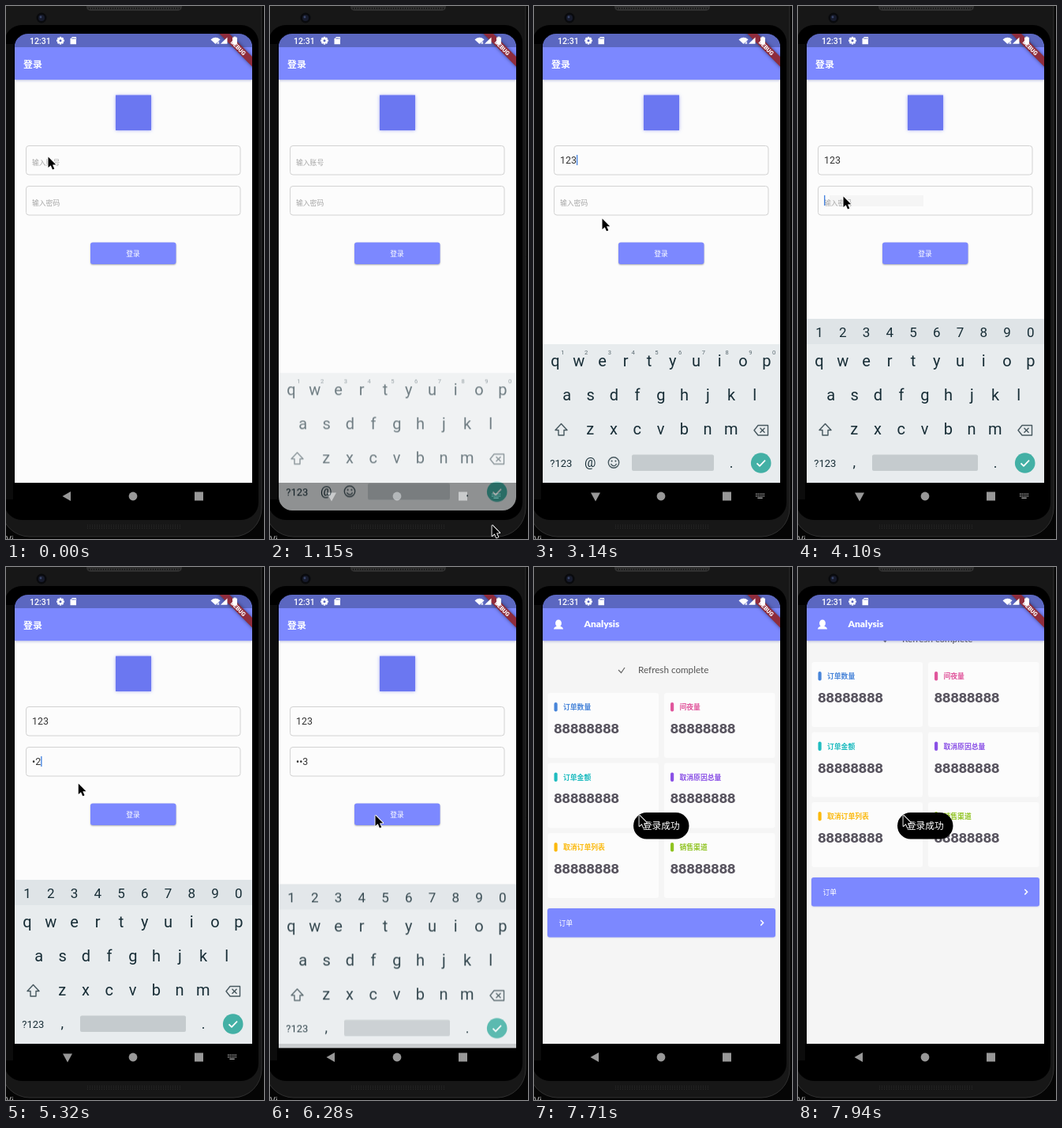
An HTML page with a canvas for the animation above (8000 ms loop, 327 px wide and 673 px high).

```html
<!DOCTYPE html>
<html lang="zh">
<head>
<meta charset="utf-8">
<title>Login</title>
<style>
html, body { margin: 0; width: 100%; height: 100%; overflow: hidden; background: #000; }
canvas { display: block; }
</style>
</head>
<body>
<canvas id="c" width="327" height="673"></canvas>
<script>
const screen2d = document.getElementById('c').getContext('2d');
const pad = document.createElement('canvas');
pad.width = 327;
pad.height = 673;
let g = screen2d; // current drawing context

const LOOP = 8000;
const CJK = '"Noto Sans CJK SC", "Noto Sans CJK", sans-serif';
const ROBOTO = 'Roboto, sans-serif';
const LATO = 'Lato, sans-serif';
const BLUE = '#7c88ff';
const INK = '#172d36';

// Pointer path: time, x, y
const PATH = [
  [0, 53, 190], [620, 53, 190], [1150, 281, 655], [1270, 282, 656], [1560, 282, 656],
  [2340, 236, 588], [2400, 236, 588], [3200, 79, 253], [3440, 57, 240],
  [4980, 57, 240], [5720, 133, 313], [LOOP, 133, 313]
];
const CARDS = [
  ['订单数量', '#4885d9'], ['间夜量', '#e0569c'], ['订单金额', '#20bcc0'],
  ['取消原因总量', '#8a50e6'], ['取消订单列表', '#fbb90c'], ['销售渠道', '#8fc320']
];

const clamp = v => Math.max(0, Math.min(1, v));
const within = (t, a, b) => t >= a && t < b;

function rect(x, y, w, h, color) {
  g.fillStyle = color;
  g.fillRect(x, y, w, h);
}
function round(x, y, w, h, r, fill, stroke) {
  g.beginPath();
  g.roundRect(x, y, w, h, r);
  if (fill) { g.fillStyle = fill; g.fill(); }
  if (stroke) { g.strokeStyle = stroke; g.lineWidth = 1; g.stroke(); }
}
function disc(x, y, r, color) {
  g.beginPath();
  g.arc(x, y, r, 0, 7);
  g.fillStyle = color;
  g.fill();
}
function poly(points, fill) {
  g.beginPath();
  points.forEach(([x, y]) => g.lineTo(x, y));
  g.closePath();
  g.fillStyle = fill;
  g.fill();
}
function line(points, color, width) {
  g.beginPath();
  points.forEach(([x, y]) => g.lineTo(x, y));
  g.strokeStyle = color;
  g.lineWidth = width;
  g.stroke();
}
function text(s, x, y, size, color, font = CJK, weight = 400, align = 'left') {
  g.font = `${weight} ${size}px ${font}`;
  g.textAlign = align;
  g.fillStyle = color;
  g.fillText(s, x, y);
}
function shadowed(color, blur, dy, draw) {
  g.save();
  g.shadowColor = color;
  g.shadowBlur = blur;
  g.shadowOffsetY = dy;
  draw();
  g.restore();
}
function faded(alpha, draw) {
  if (alpha <= 0) return;
  g.save();
  g.globalAlpha = clamp(alpha);
  draw();
  g.restore();
}

function phone() {
  rect(0, 0, 327, 673, '#050505');
  round(-6, -60, 330, 730, [0, 0, 36, 36], '#171717', '#303030');
  round(-2, 24, 322, 625, 22, '#000');
  rect(0, 48, 9, 575, '#0c0c0c');
  round(102, -5, 121, 11, 5, '#303030');
  for (let x = 105; x < 221; x += 3) rect(x, 2, 1, 2, '#161616');
  disc(45, 15, 6.5, '#090a0d');
  disc(45, 15, 4, '#171b2c');
  disc(44, 14, 1.4, '#39456a');
  for (let y = 655; y < 661; y += 2)
    for (let x = 103; x < 222; x += 3) rect(x, y, 1, 1, '#292929');
  text('Vi', 0, 677, 11, '#bbb', ROBOTO);
}

function statusBar() {
  rect(11, 35, 301, 17, '#5b67c0');
  g.save();
  g.translate(312, 35);
  g.rotate(Math.PI / 4);
  shadowed('rgba(0,0,0,.5)', 4, 0, () => rect(-40, 20.5, 80, 8.8, '#8f2c3c'));
  text('DEBUG', 0, 27.6, 7.4, '#fff', ROBOTO, 900, 'center');
  g.restore();

  text('12:31', 30, 47.6, 10.6, '#fff', ROBOTO, 500);
  g.save();
  g.translate(69, 43.7);
  for (let i = 0; i < 4; i++) {
    rect(-1.2, -4.9, 2.4, 9.8, '#fff');
    g.rotate(Math.PI / 4);
  }
  disc(0, 0, 3.7, '#fff');
  disc(0, 0, 1.5, '#5b67c0');
  g.restore();
  poly([[84, 39], [89, 39], [89, 48.3], [81.5, 48.3], [81.5, 41.5]], '#fff');
  [84, 85.7, 87.4].forEach(x => rect(x - .4, 40, .8, 2, '#5b67c0'));

  g.beginPath();
  g.moveTo(265.5, 48);
  g.arc(265.5, 48, 8.2, -Math.PI * .76, -Math.PI * .24);
  g.fillStyle = '#fff';
  g.fill();
  text('×', 267, 48.5, 7, '#fff', ROBOTO, 700);
  poly([[280.5, 39.5], [280.5, 47.8], [272, 47.8]], '#fff');
  round(287, 39.6, 6, 9, .8, '#fff');
  rect(288.6, 38.6, 2.8, 1.2, '#fff');
}

function appBar(home) {
  shadowed('rgba(70,80,180,.4)', 3, 1, () => rect(11, 40, 301, 53, BLUE));
  if (!home) return text('登录', 22, 77.6, 11.9, '#fff', CJK, 700);
  g.beginPath();
  g.ellipse(31, 71, 3.9, 4.5, 0, 0, 7);
  g.fillStyle = '#fff';
  g.fill();
  g.beginPath();
  g.moveTo(25, 78.6);
  g.quadraticCurveTo(25.2, 75.6, 29.5, 74.8);
  g.lineTo(32.5, 74.8);
  g.quadraticCurveTo(36.8, 75.6, 37, 78.6);
  g.fill();
  text('Analysis', 63.5, 76.2, 12, '#fff', LATO, 900);
}

const typed = (t, keys) => keys.filter(k => t >= k).length;

function field(y, hint, value, caret) {
  round(25.5, y + .5, 271.5, 36.5, 3.5, null, '#d2d2d2');
  if (value) text(value, 33, y + 23, 12.4, '#333', ROBOTO);
  else text(hint, 33, y + 25.3, 8.8, '#a5a5a5');
  if (caret) {
    g.font = `400 12.4px ${ROBOTO}`;
    rect(33 + g.measureText(value).width, y + 12, 1.4, 13, '#4a86e0');
  }
}

function loginPage(t) {
  rect(11, 93, 301, 509, '#fcfcfc');
  shadowed('rgba(100,110,240,.6)', 4, 0, () => rect(139, 112.5, 45, 44.5, '#6b77f1'));

  const user = '123'.slice(0, typed(t, [2480, 2700, 2940]));
  const n = typed(t, [4930, 5130, 5340]);
  const pass = t >= 6340 ? '•••' : n ? '•'.repeat(n - 1) + n : '';
  const caret1 = within(t, 660, 1060) || within(t, 1560, 2060) || within(t, 2480, 3440);
  const caret2 = within(t, 3900, 4390) || within(t, 4930, 5840);

  if (within(t, 3980, 4930)) rect(40, 239, 119, 14, '#f5f5f5');
  field(176, '输入账号', user, caret1);
  field(227, '输入密码', pass, caret2);
  shadowed('rgba(0,0,0,.3)', 2, 1, () => round(107, 298.5, 108.5, 27.5, 3, BLUE));
  text('登录', 161, 315.8, 8.8, '#fff', CJK, 400, 'center');
}

function homePage(t) {
  rect(11, 93, 301, 509, '#f5f5f5');
  if (t < 7710) return;
  const k = clamp((t - 7710) / 230);
  g.save();
  g.beginPath();
  g.rect(11, 93, 301, 509);
  g.clip();
  g.translate(0, 39 * (1 - k * k));
  line([[107, 91], [110.5, 94.5], [115, 88]], '#666', 1.2);
  text('Refresh complete', 132, 95, 11.7, '#555', LATO);
  CARDS.forEach(([label, color], i) => {
    const x = i % 2 ? 165 : 17.5;
    const y = 120 + 88.5 * (i >> 1);
    round(x, y, 140.5, 82, 3, '#fcfcfc');
    round(x + 8, y + 12, 4.2, 11.5, 2, color);
    text(label, x + 19.5, y + 21.3, 8.8, color, CJK, 700);
    text('88888888', x + 7.8, y + 51, 17.8, '#58545f', LATO, 900);
  });
  shadowed('rgba(90,100,200,.3)', 2, .6, () => round(17, 392, 289, 36.5, 3, BLUE));
  text('订单', 31.5, 413.6, 8.8, '#fff');
  line([[287.3, 407], [290.6, 410.3], [287.3, 413.6]], '#fff', 1.5);
  g.restore();
}

function navBar(open) {
  const gray = '#989898';
  rect(11, 602, 301, 35, '#000');
  poly(open ? [[72, 614.5], [84, 614.5], [78, 625.5]] : [[82, 613], [82, 625], [71.5, 619]], gray);
  disc(161, 619, 5.4, gray);
  rect(239, 613.5, 11, 11, gray);
  if (!open) return;
  for (let i = 0; i < 5; i++) {
    rect(281 + i * 2.4, 615.5, 1.5, 1.5, gray);
    rect(281 + i * 2.4, 618, 1.5, 1.5, gray);
  }
  rect(283.4, 620.5, 6.3, 1.5, gray);
}

function keyRow(chars, x, y, size = 20) {
  [...chars].forEach((c, i) => text(c, x + i * 29.75, y, size, INK, ROBOTO, 400, 'center'));
}

function keyboard(secret) {
  rect(11, 427, 301, 175, '#e8ecee');
  if (secret) {
    rect(11, 395, 301, 32, '#dfe4e7');
    keyRow('1234567890', 27, 418, 17);
  } else {
    [...'1234567890'].forEach((c, i) =>
      text(c, 36.3 + i * 29.75, 440.3, 7.6, '#5b6a71', ROBOTO, 400, 'center'));
  }
  keyRow('qwertyuiop', 27, 455);
  keyRow('asdfghjkl', 41.8, 498);
  keyRow('zxcvbnm', 71.3, 541);

  const icon = '#47585f';
  g.lineJoin = 'round';
  line([[34.5, 527.5], [42, 535.5], [38, 535.5], [38, 542], [31, 542], [31, 535.5], [27, 535.5],
    [34.5, 527.5], [36, 529]], icon, 1.4);
  line([[284, 529.5], [296.5, 529.5], [296.5, 542], [284, 542], [279, 535.7], [284, 529.5], [286, 529.5]], icon, 1.4);
  line([[286.5, 532.7], [292.5, 538.7]], icon, 1.4);
  line([[292.5, 532.7], [286.5, 538.7]], icon, 1.4);

  text('?123', 34.3, 581.7, 13, INK, ROBOTO, 400, 'center');
  text(secret ? ',' : '@', 71.3, 582, secret ? 18 : 16, INK, ROBOTO, 400, 'center');
  if (!secret) {
    g.lineWidth = 1.4;
    g.strokeStyle = icon;
    g.beginPath();
    g.arc(101, 576.5, 6.7, 0, 7);
    g.stroke();
    g.beginPath();
    g.arc(101, 577, 3.6, .25, Math.PI - .25);
    g.stroke();
    disc(98.6, 574.6, 1.1, icon);
    disc(103.4, 574.6, 1.1, icon);
  }
  const left = secret ? 94 : 124;
  round(left, 566.5, 228 - left, 20.5, 2, '#c5cbce');
  text('.', 250, 583, 18, INK, ROBOTO, 400, 'center');
  disc(287.7, 577, 12.8, '#43b0a5');
  line([[282.5, 577.3], [286, 580.8], [293, 573.6]], '#fff', 1.7);
}

function keyboardLayer(t) {
  if (!within(t, 1060, 6390)) return;
  const rise = clamp((t - 1060) / 200);
  const fall = clamp((t - 6220) / 250);
  const alpha = Math.min(1, rise * 1.35) * (1 - 2.16 * fall * fall);
  const dy = 96 * (1 - rise) ** 1.6 + 90 * fall * fall;
  // Flatten the keys first so the whole panel fades as one
  g = pad.getContext('2d');
  g.clearRect(0, 0, 327, 673);
  keyboard(t >= 3920);
  g = screen2d;
  faded(alpha, () => g.drawImage(pad, 0, dy));
}

function toast(t) {
  faded((t - 6810) / 305, () => {
    round(126, 310, 70.5, 33.5, 16.7, '#000');
    text('登录成功', 161.3, 331.3, 11.7, '#fff', CJK, 400, 'center');
  });
}

function pointer(t) {
  const i = PATH.findIndex(p => p[0] > t);
  const [t0, x0, y0] = PATH[i - 1];
  const [t1, x1, y1] = PATH[i];
  const u = (t - t0) / (t1 - t0);
  const k = (u + u * u * (3 - 2 * u)) / 2;
  g.save();
  g.translate(x0 + (x1 - x0) * k, y0 + (y1 - y0) * k);
  const arrow = [[.5, .5], [.5, 14], [3.7, 11.2], [6, 16.4], [8.3, 15.4], [6, 10.4], [10.2, 10.2]];
  g.lineJoin = 'round';
  line([...arrow, arrow[0]], '#fff', 1.8);
  poly(arrow, '#000');
  g.restore();
}

function frame() {
  const t = performance.now() % LOOP;
  const home = clamp((t - 6810) / 120);
  phone();
  g.save();
  g.beginPath();
  g.roundRect(11, 35, 301, 602, 17);
  g.clip();
  if (home < 1) {
    loginPage(t);
    appBar(false);
  }
  faded(home, () => {
    homePage(t);
    appBar(true);
  });
  statusBar();
  navBar(within(t, 1060, 6250));
  keyboardLayer(t);
  g.restore();
  toast(t);
  pointer(t);
  requestAnimationFrame(frame);
}
requestAnimationFrame(frame);
</script>
</body>
</html>
```
